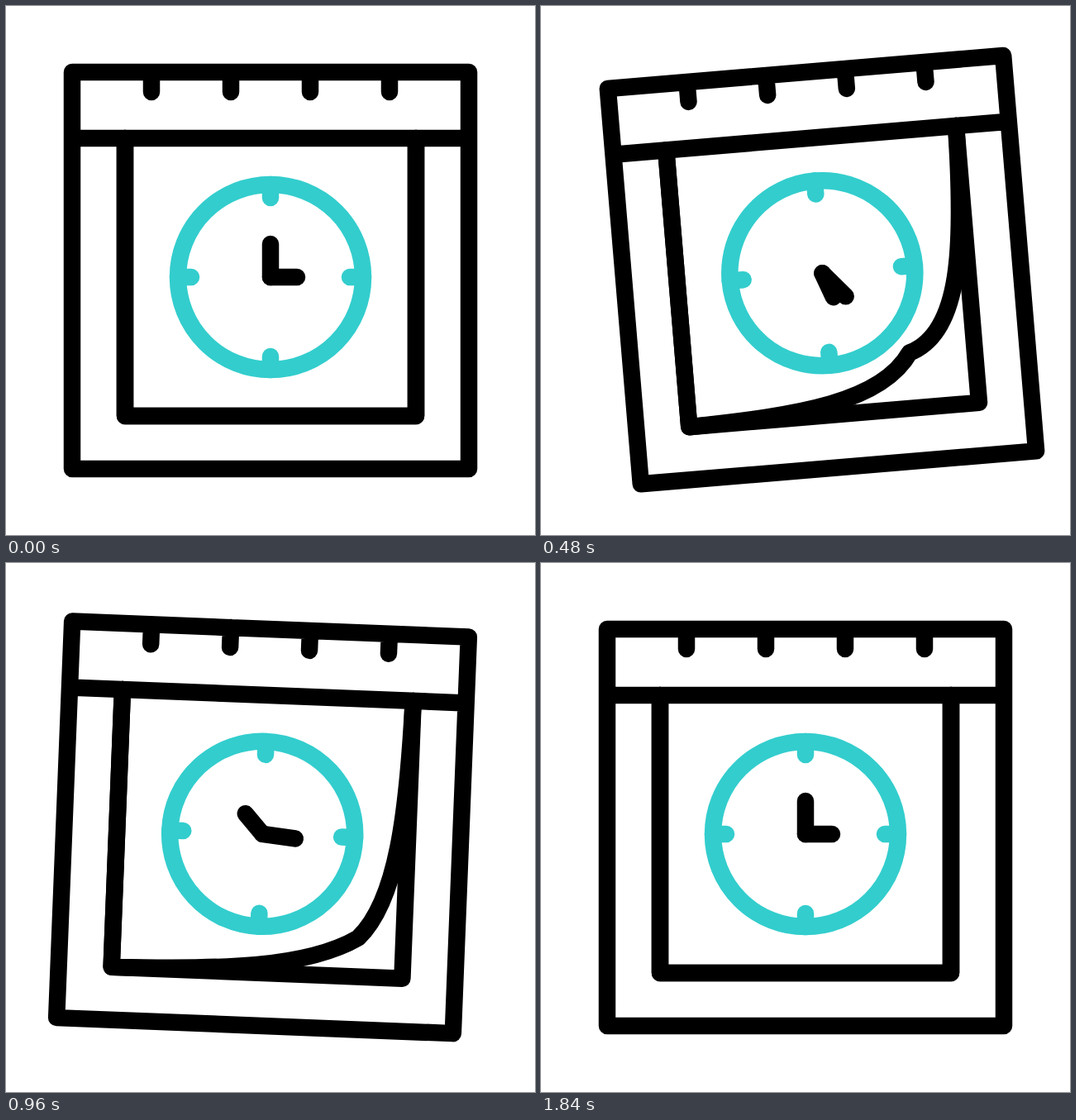
An HTML page for the animation above (2 s loop, 640 px wide and 640 px high).

```html
<!DOCTYPE html>
<html lang="en">
<head>
<meta charset="utf-8">
<title>Calendar clock</title>
<style>
html, body { margin: 0; height: 100%; overflow: hidden; background: #fff; }
svg { display: block; width: 100vw; height: 100vh; }
g { fill: none; stroke: #000; stroke-width: 20.5; stroke-linecap: round; stroke-linejoin: round; }
#dial { stroke: #33cdcd; }
</style>
</head>
<body>
<svg viewBox="0 0 640 640">
  <g id="calendar">
    <path d="M80 80H560V560H80ZM80 160H560M176 80v24M272 80v24M368 80v24M464 80v24"/>
    <path d="M144 160V496H496V160"/>
    <g id="clock">
      <g id="dial">
        <circle cx="320" cy="328" r="112"/>
        <path d="M320 216v16M320 440v-16M208 328h16M432 328h-16"/>
      </g>
      <path id="minute" d="M320 328v-40"/>
      <path id="hour" d="M320 328h32"/>
    </g>
    <path id="sheet"/>
  </g>
</svg>
<script>
const LOOP = 2000, STEP = 40;
const $ = id => document.getElementById(id);
const clamp = x => Math.min(1, Math.max(0, x));
const ease = x => (x = clamp(x), x * x * (3 - 2 * x));
const span = (t, a, b) => clamp((t - a) / (b - a));
const mix = (a, b, k) => a + (b - a) * k;

// Damped swing: [time, degrees]
const swing = [[0, 0], [440, -5], [840, 3], [1280, -1], [1840, 0]];

function swingAt(t) {
  for (let i = 1; i < swing.length; i++) {
    const [t0, a] = swing[i - 1], [t1, b] = swing[i];
    if (t < t1) return mix(a, b, ease(span(t, t0, t1)));
  }
  return 0;
}

const curlAt = t => t < 640
  ? ease(span(t, 40, 640))
  : (1 - span(t, 640, 1600)) ** 1.36;

// The loose corner moves inwards while its curve handles turn
function sheetPath(k) {
  const x = 496 - 95.5 * k, y = 496 - 81.6 * k;
  const p = (a, b, c, d) => mix(a, b, k) + " " + mix(c, d, k) + " ";
  return "M144 160V496C" + p(261, 283, 496, 492.5) +
    p(x - 117, x - 22, y, y + 68.7) + x + " " + y +
    "C" + p(x, x + 78, y - 112, y + 1) + p(496, 493, 272, 313) + "496 160";
}

const turn = (id, deg, y) => $(id).setAttribute("transform", `rotate(${deg} 320 ${y})`);

function draw() {
  const t = Math.floor(performance.now() % LOOP / STEP) * STEP;
  const hours = ease(span(t, 40, 1600));
  const lift = 12 * ease(1 - Math.abs(t - 640) / 260);
  turn("calendar", swingAt(t), 80);
  turn("minute", 720 * hours, 328);
  turn("hour", 360 * hours, 328);
  $("clock").setAttribute("transform", `translate(0 ${-lift})`);
  $("sheet").setAttribute("d", sheetPath(curlAt(t)));
  requestAnimationFrame(draw);
}
draw();
</script>
</body>
</html>
```
